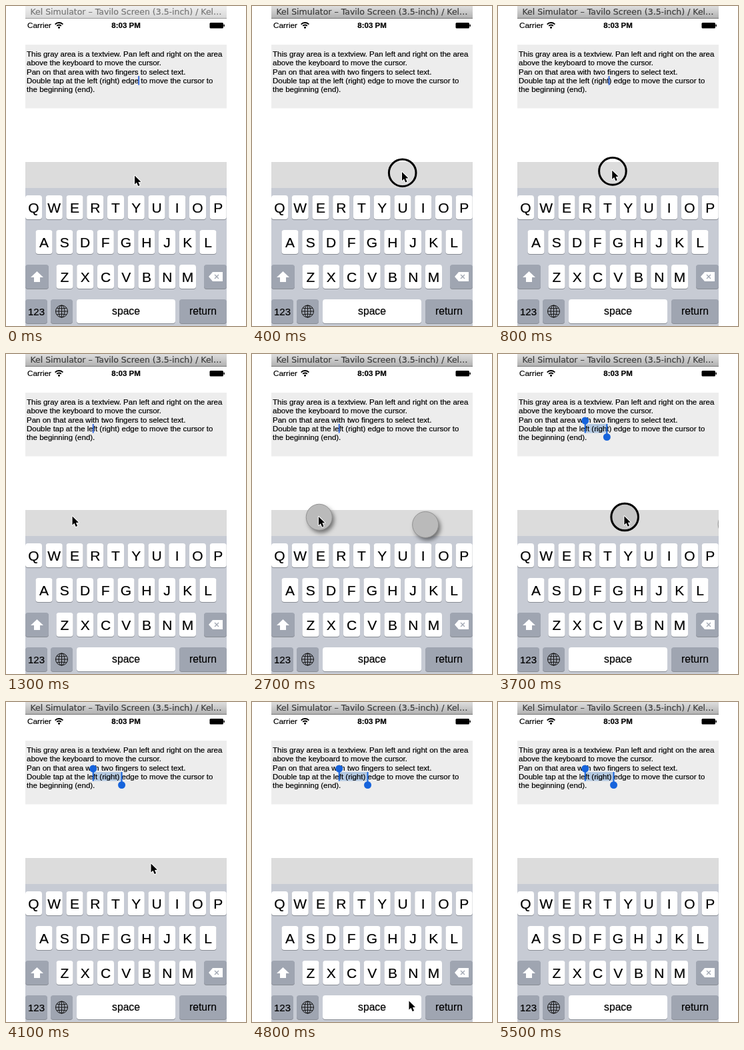
Write an HTML page with a canvas that moves like this. It is 360 px wide and 480 px high and loops after 5.6 s.

```html
<!DOCTYPE html>
<html lang="en">
<head>
<meta charset="utf-8">
<title>Pan to move the cursor</title>
<style>
html, body { margin: 0; width: 100%; height: 100%; overflow: hidden; background: #fff; }
canvas { display: block; }
</style>
</head>
<body>
<canvas id="stage" width="360" height="480"></canvas>
<script>
const ctx = document.getElementById('stage').getContext('2d');
const SANS = '"Liberation Sans", Arial, sans-serif';
const LOOP = 5600, STEP = 100;
const LEFT = 29, RIGHT = 331;
const TEXT_X = 31, TEXT_Y = 76, LINE_HEIGHT = 13.3, TEXT_SIZE = 11.5;
const FIRST_CLICK = 300;
const LINES = [
  'This gray area is a textview. Pan left and right on the area',
  'above the keyboard to move the cursor.',
  'Pan on that area with two fingers to select text.',
  'Double tap at the left (right) edge to move the cursor to',
  'the beginning (end).'
];
const EDITED = LINES[3];
const BLUE = '#1764dc';
const MOUSE = [
  [0, 193, 254.5], [300, 225, 249], [500, 225, 249], [1200, 99.5, 243.5],
  [2900, 100, 244], [3300, 144.5, 244.5], [3950, 217.5, 242.5],
  [4400, 217.5, 242.5], [4900, 240, 500]
];

const progress = (t, from, to) => Math.min(1, Math.max(0, (t - from) / (to - from)));

function mouseAt(t) {
  const next = MOUSE.findIndex(p => p[0] > t);
  if (next < 0) return null;
  const [t0, x0, y0] = MOUSE[next - 1], [t1, x1, y1] = MOUSE[next];
  const k = progress(t, t0, t1);
  return [x0 + (x1 - x0) * k, y0 + (y1 - y0) * k];
}

function rect(x, y, w, h, color) {
  ctx.fillStyle = color;
  ctx.fillRect(x, y, w, h);
}

function roundRect(x, y, w, h, r, color) {
  ctx.fillStyle = color;
  ctx.beginPath();
  ctx.roundRect(x, y, w, h, r);
  ctx.fill();
}

function circle(x, y, r) {
  ctx.beginPath();
  ctx.arc(x, y, r, 0, Math.PI * 2);
}

function polygon(points, color) {
  ctx.fillStyle = color;
  ctx.beginPath();
  points.forEach(([x, y]) => ctx.lineTo(x, y));
  ctx.closePath();
  ctx.fill();
}

function stroke(color, width) {
  ctx.strokeStyle = color;
  ctx.lineWidth = width;
  ctx.stroke();
}

// A hairline stroke gives the text its slightly heavier weight.
function text(str, x, y, size, { align = 'left', weight = '', family = SANS, color = '#000' } = {}) {
  ctx.font = `${weight} ${size}px ${family}`;
  ctx.textAlign = align;
  ctx.fillStyle = ctx.strokeStyle = color;
  ctx.lineWidth = .2;
  ctx.fillText(str, x, y);
  ctx.strokeText(str, x, y);
}

function caretX(index) {
  ctx.font = `${TEXT_SIZE}px ${SANS}`;
  return TEXT_X + ctx.measureText(EDITED.slice(0, index)).width;
}

function drawTitleBar(active) {
  const shade = ctx.createLinearGradient(0, 0, 0, 18);
  shade.addColorStop(0, active ? '#dedede' : '#f0f0f0');
  shade.addColorStop(1, active ? '#b2b2b2' : '#d8d8d8');
  rect(LEFT, 0, RIGHT - LEFT, 18, shade);
  rect(LEFT, 18, RIGHT - LEFT, 1, active ? '#777' : '#999');
  text('Kel Simulator – Tavilo Screen (3.5-inch) / Kel…', 180, 13, 12.5,
    { align: 'center', family: '"DejaVu Sans", sans-serif', color: active ? '#3c3c3c' : '#777' });
}

function drawStatusBar() {
  text('Carrier', 32, 33, 11.8);
  text('8:03 PM', 180, 33, 11.5, { align: 'center', weight: 'bold' });
  for (const r of [4.5, 8]) {
    ctx.beginPath();
    ctx.arc(79.5, 33, r, -Math.PI * .76, -Math.PI * .24);
    stroke('#000', 1.8);
  }
  circle(79.5, 32.3, 1.5);
  ctx.fillStyle = '#000';
  ctx.fill();
  roundRect(305.5, 25, 20.5, 8.5, 1.5, '#000');
  roundRect(326.5, 27.5, 1.5, 3.5, 1, '#000');
}

function key(x, y, w, color = '#fff') {
  roundRect(x, y + 1, w, 36, 4, '#888c94');
  roundRect(x, y, w, 36, 4, color);
}

function drawKeyboard() {
  const dark = '#9fa5b1';
  rect(LEFT, 234, RIGHT - LEFT, 39, '#dcdcdc');
  rect(LEFT, 273, RIGHT - LEFT, 207, '#c7cbd4');
  [['QWERTYUIOP', 41.5, 284], ['ASDFGHJKL', 57, 336], ['ZXCVBNM', 88, 388]]
    .forEach(([letters, firstX, y]) => [...letters].forEach((letter, i) => {
      const x = firstX + i * 30.75;
      key(x - 12.5, y, 25);
      text(letter, x, y + 25.5, 21, { align: 'center' });
    }));

  key(29, 388, 35, dark);
  polygon([[46.5, 398], [56, 407], [51, 407], [51, 414], [42, 414], [42, 407], [37, 407]], '#fff');
  key(297, 388, 34, dark);
  polygon([[304, 406], [310, 399], [325, 399], [325, 413], [310, 413]], '#fff');
  ctx.beginPath();
  for (const d of [-3, 3]) {
    ctx.moveTo(316 - d, 403);
    ctx.lineTo(316 + d, 409);
  }
  stroke(dark, 1.3);

  key(29, 440, 33, dark);
  text('123', 45.5, 463.5, 15, { align: 'center' });
  key(67, 440, 33, dark);
  drawGlobe(83.5, 458, 9);
  key(106, 440, 148);
  text('space', 180, 462.5, 15.7, { align: 'center' });
  key(260, 440, 71, dark);
  text('return', 295.5, 462.5, 15.7, { align: 'center' });
}

function drawGlobe(x, y, r) {
  circle(x, y, r);
  ctx.moveTo(x, y - r);
  ctx.lineTo(x, y + r);
  ctx.moveTo(x - r, y);
  ctx.lineTo(x + r, y);
  ctx.moveTo(x + 4.5, y);
  ctx.ellipse(x, y, 4.5, r, 0, 0, Math.PI * 2);
  for (const d of [-4.8, 4.8]) {
    ctx.moveTo(x - 7.4, y + d);
    ctx.quadraticCurveTo(x, y + d * .7, x + 7.4, y + d);
  }
  stroke('#111', 1);
}

function drawTextView(t) {
  rect(LEFT, 58, RIGHT - LEFT, 95.5, '#ededed');
  const selected = Math.round(11 * progress(t, 2900, 3950));
  const from = caretX(20), to = caretX(20 + selected);
  if (selected) rect(from, 105, to - from, 13.5, '#b5cae2');
  LINES.forEach((line, i) => text(line, TEXT_X, TEXT_Y + i * LINE_HEIGHT, TEXT_SIZE));

  if (selected) {
    rect(from - 1, 100, 2, 18.5, BLUE);
    rect(to - 1, 105, 2, 19, BLUE);
    for (const [x, y] of [[from, 100], [to, 124.5]]) {
      circle(x, y, 5.5);
      ctx.fillStyle = BLUE;
      ctx.fill();
    }
    return;
  }
  const dragging = t >= 500 && t < 1300;
  const blinkOn = t < 1300 ? t < 300 : (t - 1300) % 1000 < 500;
  if (dragging || blinkOn) {
    const index = 35 - Math.round(15 * progress(t, 500, 1200));
    rect(caretX(index) - 1, 105, 2, 13.5, '#3b70e4');
  }
}

function drawTouch(x, y, pressed) {
  ctx.save();
  if (!pressed) {
    ctx.shadowColor = 'rgba(0,0,0,.5)';
    ctx.shadowBlur = 6;
    ctx.shadowOffsetX = 3;
    ctx.shadowOffsetY = 4;
  }
  circle(x, y, 19.5);
  ctx.fillStyle = pressed ? '#c6c6c6' : '#bababa';
  ctx.fill();
  ctx.restore();
  stroke('#939393', 1);
}

function drawPointer(x, y) {
  ctx.beginPath();
  [[0, 0], [0, 13], [3, 10.3], [5.2, 15.5], [7.6, 14.5], [5.4, 9.4], [9.4, 9.2]]
    .forEach(([dx, dy]) => ctx.lineTo(x + dx, y + dy));
  ctx.closePath();
  ctx.lineJoin = 'round';
  stroke('#fff', 2);
  ctx.fillStyle = '#000';
  ctx.fill();
}

function drawInput(t) {
  const mouse = mouseAt(t);
  if (!mouse) return;
  const [x, y] = mouse;
  const selecting = t >= 2800 && t < 4000;
  ctx.save();
  ctx.beginPath();
  ctx.rect(LEFT, 0, RIGHT - LEFT, 480);
  ctx.clip();
  if (t >= 2000 && t < 4000) {
    drawTouch(x + .8, y + .8, selecting);
    drawTouch(x + 160.2, y + 12, selecting);
  }
  if (selecting || (t >= FIRST_CLICK && t < 1300)) {
    circle(x + .7, y + 1.2, 20.3);
    stroke('#000', 3);
  }
  drawPointer(x, y);
  ctx.restore();
}

function draw(now) {
  const t = Math.floor((now % LOOP) / STEP) * STEP;
  rect(0, 0, 360, 480, '#fff');
  drawTitleBar(t >= FIRST_CLICK);
  drawStatusBar();
  drawTextView(t);
  drawKeyboard();
  drawInput(t);
  requestAnimationFrame(() => draw(performance.now() - start));
}

const start = performance.now();
draw(0);
</script>
</body>
</html>
```
